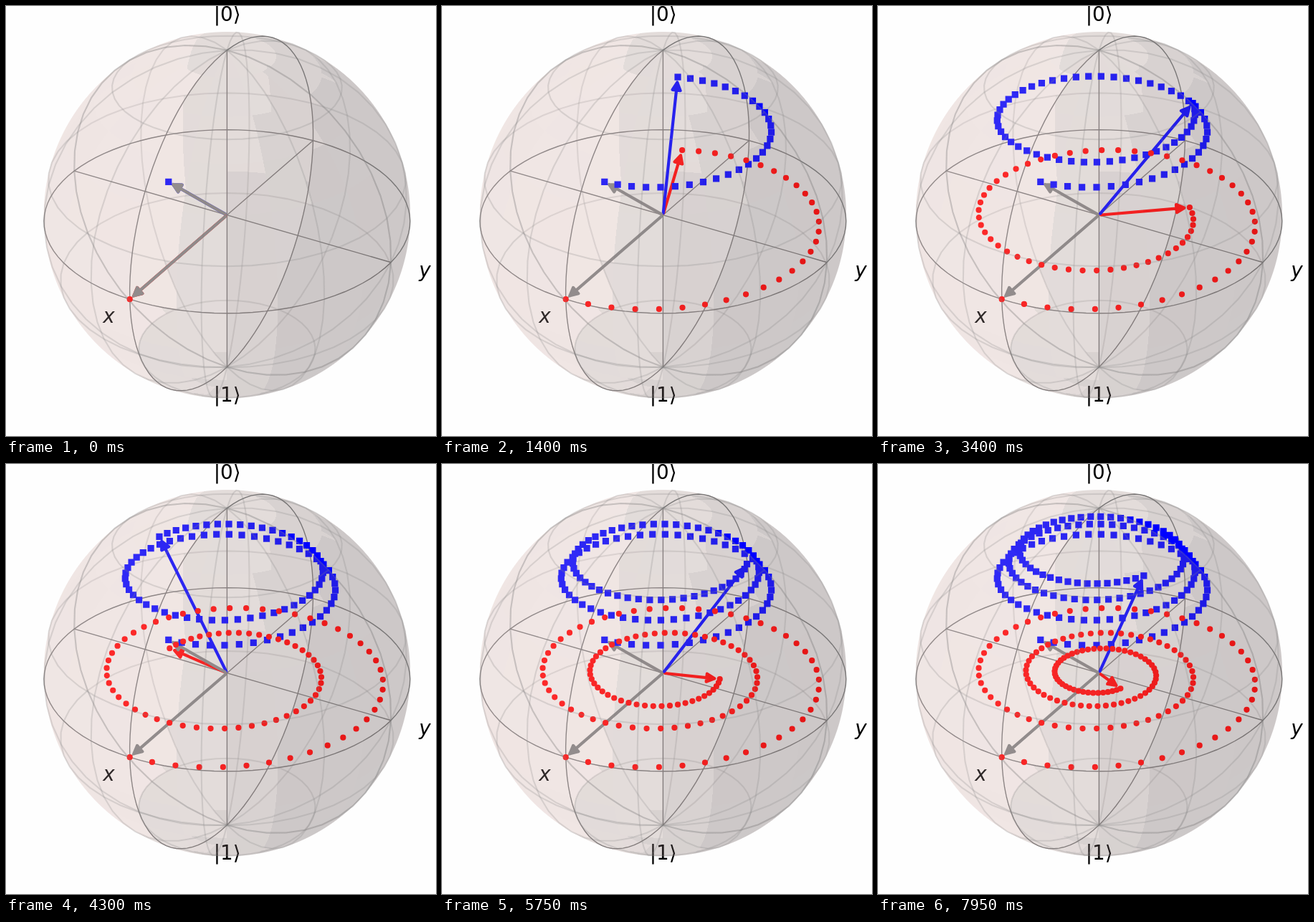
These frames come from a looping animation (600x600 px, 8 s). An HTML page with a canvas:

```html
<!DOCTYPE html>
<html lang="en">
<head>
<meta charset="utf-8">
<title>Bloch sphere</title>
<style>
html, body { margin: 0; width: 100%; height: 100%; overflow: hidden; background: #fefefe; }
canvas, svg { position: absolute; left: 0; top: 0; width: 100%; height: 100%; display: block; }
text { font: 27.8px "DejaVu Sans", sans-serif; text-anchor: middle; }
.it { font-style: italic; }
.line { fill: none; stroke: #787676; stroke-width: 1.39; }
.wire { fill: none; stroke: #808080; stroke-width: 2.08; stroke-opacity: .23; }
.arrow { stroke-width: 4.17; stroke-linejoin: round; stroke-linecap: round; }
</style>
</head>
<body>
<canvas id="base" width="600" height="600"></canvas>
<svg viewBox="0 0 600 600">
  <text x="308.6" y="21">|0⟩</text>
  <text x="308.6" y="552">|1⟩</text>
  <text class="it" x="143.4" y="441.5">x</text>
  <text class="it" x="584.6" y="377.5">y</text>
  <g id="frame"></g>
  <g id="arrows"></g>
  <path id="squares" fill="#00f"/>
  <path id="dots" fill="#f00"/>
</svg>
<canvas id="glass" width="600" height="600"></canvas>
<svg viewBox="0 0 600 600"><g id="wires"></g></svg>
<script>
const CX = 308.4, CY = 291.7, S = 254.8, P = 0.0814, RAD = Math.PI / 180;
const RIGHT = [0.866, 0.5, 0], UP = [-0.25, 0.433, 0.866], EYE = [0.433, -0.75, 0.5];
const LIGHT = [-0.667, -0.667, 0.333];
const STEP = 50, COUNT = 160, TURN = 7.2 * RAD;
const $ = id => document.getElementById(id);
const dot = (a, b) => a[0] * b[0] + a[1] * b[1] + a[2] * b[2];

// Perspective view of a point in plot space: [screen x, screen y, depth]
function project(p) {
  const d = dot(p, EYE), f = S / (1 - P * d);
  return [CX + dot(p, RIGHT) * f, CY - dot(p, UP) * f, d];
}
const bloch = (x, y, z) => project([y, -x, z]);
const ball = (u, v) => [Math.cos(u) * Math.sin(v), Math.sin(u) * Math.sin(v), Math.cos(v)];

// Brightness of the 15 degree facet that holds point p
function shade(p) {
  const q = 15 * RAD, mid = a => (Math.floor(a / q) + 0.5) * q;
  const u = mid(Math.atan2(p[1], p[0])), v = mid(Math.acos(Math.max(-1, Math.min(0.99999, p[2]))));
  return 0.3 + 0.35 * (1 + dot(ball(u, v), LIGHT));
}

// Base layer plus the near half, which lies like tinted glass over the vectors
function paintSphere() {
  const tones = [[240, 230, 228], [227, 220, 218], [216, 210, 209], [205, 200, 200]];
  const cuts = [233, 222.5, 212];
  const tint = [255, 221, 221];
  const edge = S / Math.sqrt(1 - P * P);
  const [base, glass] = ["base", "glass"].map(id => $(id).getContext("2d"));
  const under = base.createImageData(600, 600), over = glass.createImageData(600, 600);
  for (let y = 0; y < 600; y++) for (let x = 0; x < 600; x++) {
    const dx = x + 0.5 - CX, dy = CY - y - 0.5;
    const cover = Math.min(1, edge - Math.hypot(dx, dy) + 0.5);
    if (cover <= 0) continue;
    const a = (dx * dx + dy * dy) / (S * S), k = a * P * P + 1;
    const root = Math.sqrt(Math.max(0, a * a * P * P - k * (a - 1)));
    const hit = sign => {
      const d = (a * P + sign * root) / k, f = (1 - P * d) / S;
      return [0, 1, 2].map(i => RIGHT[i] * dx * f + UP[i] * dy * f + EYE[i] * d);
    };
    const near = hit(1), sn = shade(near), sf = shade(hit(-1));
    const red = 255 * (0.64 + 0.16 * sf + 0.2 * sn);
    const tone = tones[cuts.filter(c => red < c).length];
    const front = near[1] < 0, o = (y * 600 + x) * 4;
    for (let c = 0; c < 3; c++) {
      const g = tint[c] * sn;
      under.data[o + c] = front ? (tone[c] - 0.2 * g) / 0.8 : tone[c];
      over.data[o + c] = g;
    }
    under.data[o + 3] = 255 * cover;
    over.data[o + 3] = front ? 51 * cover : 0;
  }
  base.putImageData(under, 0, 0);
  glass.putImageData(over, 0, 0);
}

const toPath = pts => "M" + pts.map(p => p[0].toFixed(2) + " " + p[1].toFixed(2)).join("L");
const trace = (fn, from, to, n) =>
  toPath(Array.from({ length: n + 1 }, (_, i) => project(fn((from + (to - from) * i / n) * RAD))));
const pathTag = (cls, d) => `<path class="${cls}" d="${d}"/>`;

function drawFrame() {
  const grid = [0, 37.5, 75, 112.5, 150, 180];
  const half = start => grid.map(g =>
    pathTag("wire", trace(v => ball((start + g) * RAD, v), 0, 180, 24)) +
    (g % 180 ? pathTag("wire", trace(u => ball(u, g * RAD), start, start + 180, 24)) : "")).join("");
  const axes = [[1, 0, 0], [0, 1, 0], [0, 0, 1]].map(a =>
    pathTag("line", toPath([project(a), project(a.map(c => -c))]))).join("");
  $("frame").innerHTML = half(0) + axes +
    pathTag("line", trace(u => [Math.cos(u), Math.sin(u), 0], 0, 360, 96)) +
    pathTag("line", trace(u => [0, Math.cos(u), Math.sin(u)], 0, 360, 96));
  $("wires").innerHTML = half(-180);
}

// Pure dephasing, and relaxation towards the upper pole
const spin = (k, r, z) => bloch(r * Math.cos(k * TURN), r * Math.sin(k * TURN), z);
const steps = Array.from({ length: COUNT }, (_, k) => k);
const reds = steps.map(k => spin(k, Math.exp(-0.01 * k), 0));
const blues = steps.map(k => spin(k, 0.604 * Math.exp(-0.0025 * k), 1 - 0.5 * Math.exp(-0.005 * k)));

function arrow(tip, color) {
  const dx = tip[0] - CX, dy = tip[1] - CY, len = Math.hypot(dx, dy), ux = dx / len, uy = dy / len;
  const at = (along, side) => [CX + ux * along - uy * side, CY + uy * along + ux * side];
  const end = len - 7.44, back = end - 11.1;
  return `<path class="arrow" stroke="${color}" fill="${color}" d="` +
    toPath([at(2.78, 0), at(end, 0)]) +
    toPath([at(end, 0), at(back, 5.56), at(back, -5.56)]) + 'Z"/>';
}

const disc = p => `M${(p[0] - 4.1).toFixed(2)} ${p[1].toFixed(2)}a4.1 4.1 0 1 0 8.2 0a4.1 4.1 0 1 0 -8.2 0z`;
const square = p => `M${(p[0] - 4.6).toFixed(2)} ${(p[1] - 4.6).toFixed(2)}h9.2v9.2h-9.2z`;

function draw(k) {
  const list = [[reds[k], "#f00"], [blues[k], "#00f"], [blues[0], "#808080"], [reds[0], "#808080"]];
  list.sort((a, b) => Math.max(0, a[0][2]) - Math.max(0, b[0][2]));
  $("arrows").innerHTML = list.map(a => arrow(...a)).join("");
  $("dots").setAttribute("d", reds.slice(0, k + 1).map(disc).join(""));
  $("squares").setAttribute("d", blues.slice(0, k + 1).map(square).join(""));
}

paintSphere();
drawFrame();
draw(0);
let start = null, shown = 0;
function tick(now) {
  if (start === null) start = now;
  const k = Math.floor(Math.max(0, now - start) / STEP) % COUNT;
  if (k !== shown) draw(shown = k);
  requestAnimationFrame(tick);
}
requestAnimationFrame(tick);
</script>
</body>
</html>
```
